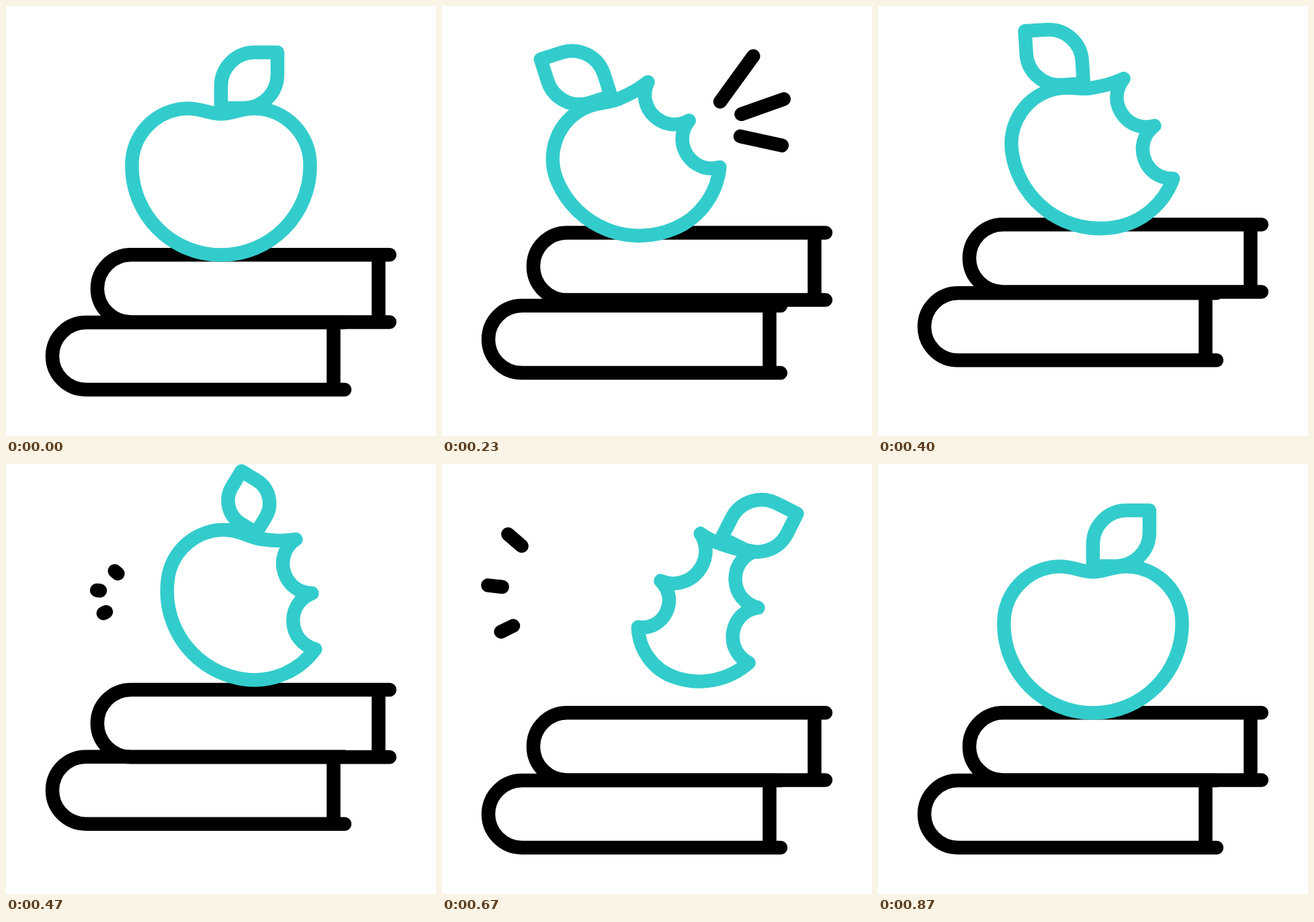
An HTML page for the animation above (1.67 s loop, 640 by 640 pixels).

```html
<!DOCTYPE html>
<html lang="en">
<head>
<meta charset="utf-8">
<title>Apple on books</title>
<style>
  html, body { margin: 0; width: 100%; height: 100%; overflow: hidden; background: #fff; }
  svg { display: block; width: 100vw; height: 100vh; }
  path { stroke-width: 20.5; stroke-linecap: round; stroke-linejoin: round; }
</style>
</head>
<body>
<svg viewBox="0 0 640 640">
  <g fill="none" stroke="#000">
    <path id="low" d="M504 471H119a50 50 0 0 0 0 100H504M487.5 471V571"/>
    <path id="top" d="M571 370.3H186a50 50 0 0 0 0 100.2H571M554.5 370.3V470.5"/>
    <path id="sparksRight" transform="translate(445.5 161) rotate(-19.5)"/>
    <path id="sparksLeft" transform="translate(140 188.5) scale(-1 1) rotate(-6.3)"/>
  </g>
  <g id="apple" fill="#fff" stroke="#33cccc">
    <path id="leaf"/>
    <path id="body"/>
  </g>
</svg>
<script>
const LOOP = 1670, FPS = 30, LAST = 26;
const RADIUS = 132.6, DIP = -77.5, RAD = Math.PI / 180;

const el = id => document.getElementById(id);
const mix = (a, b, p) => a + (b - a) * p;
const place = (id, transform) => el(id).setAttribute("transform", transform);
const shape = (id, d) => el(id).setAttribute("d", d);

// Eased 0..1 progress of frame k between a and b
function ease(k, a, b) {
  const t = Math.min(1, Math.max(0, (k - a) / (b - a)));
  return t * t * (3 - 2 * t);
}

// Corner points of one half: shoulder, side, hip
const WHOLE = [[50, -85.5], [RADIUS, 0], [RADIUS * Math.SQRT1_2, RADIUS * Math.SQRT1_2]];
const RIGHT_BITE = [[50, -83], [83, -6], [97, 76]];
const LEFT_BITE = [[34, -82], [67, 4], [76, 80]];
const BITE_ARC = -145;

// Circular arc of the given sweep in degrees; a negative sweep cuts inward
function arc([ax, ay], [bx, by], sweep) {
  const half = sweep / 2 * RAD;
  const reach = 4 / 3 * Math.tan(half / 2) / (2 * Math.sin(half));
  const along = reach * Math.cos(half), out = reach * Math.sin(half);
  const dx = bx - ax, dy = by - ay;
  return [
    [ax + dx * along + dy * out, ay + dy * along - dx * out],
    [bx - dx * along + dy * out, by - dy * along - dx * out],
    [bx, by]
  ];
}

// Half outline from the dip to the bottom; p runs from whole to bitten
function half(bite, p) {
  const [a, b, c] = WHOLE.map((pt, i) => pt.map((n, j) => mix(n, bite[i][j], p)));
  const belly = 2 * Math.atan2(RADIUS - c[1], c[0]) / RAD;
  return [
    [0, DIP], [a[0] * 0.36, DIP], [a[0] * 0.55, mix(a[1], DIP, p)], a,
    ...arc(a, b, mix(90, BITE_ARC, p)),
    ...arc(b, c, mix(45, BITE_ARC, p)),
    ...arc(c, [0, RADIUS], belly)
  ];
}

function bodyPath(right, left) {
  const mirrored = half(LEFT_BITE, left).map(([x, y]) => [-x, y]).reverse();
  const [start, ...rest] = [...half(RIGHT_BITE, right), ...mirrored.slice(1)];
  return `M${start}C${rest.join(" ")}Z`;
}

function leafPath(s) {
  const r = 50 * s;
  return `M0 0V${-33 * s}a${r} ${r} 0 0 1 ${r} ${-r}H${84 * s}v${33 * s}a${r} ${r} 0 0 1 ${-r} ${r}Z`;
}

// Inner end, angle and length of each ray in a burst
const RAYS = [[-23.5, -28, -34.5, 90], [0, 0, 0, 72], [-12.4, 30.5, 32, 68]];

// Rays grow from the inner end, then shrink toward the outer end
function sparkPath(k) {
  const head = ease(k, 0, 4.4), tail = ease(k, 3.7, 8.4);
  if (head <= 0 || tail >= 1) return "";
  return RAYS.map(([x, y, angle, length]) => {
    const dx = length * Math.cos(angle * RAD), dy = length * Math.sin(angle * RAD);
    return `M${x + dx * tail} ${y + dy * tail}L${x + dx * head} ${y + dy * head}`;
  }).join("");
}

function drawBooks(k) {
  place("top", `translate(0 ${-47 * (ease(k, 0, 11) - ease(k, 10.9, 20))})`);
  place("low", `translate(0 ${-44 * (ease(k, 1.4, 11.7) - ease(k, 11.6, 20))})`);
}

// Lean left, swing right with a hop, then settle back
function drawApple(k) {
  const swing = ease(k, 9, 17), settle = ease(k, 18.9, 26);
  const x = 320 - 26 * ease(k, 0, 7) + 111 * ease(k, 9, 16.8) - 85 * ease(k, 17.8, 26);
  const y = 238 - 30 * ease(k, 0, 8) - 19 * ease(k, 10, 14) + 49 * settle;
  const turn = -24 * ease(k, 0, 7.5) + 44.5 * swing - 20.5 * settle;
  place("apple", `translate(${x} ${y}) rotate(${turn})`);

  const heal = 1 - ease(k, 20, 26);
  shape("body", bodyPath(ease(k, 1, 4) * heal, ease(k, 14, 16.5) * heal));

  // The leaf flips left by turning and flips back through a narrower shape
  const back = ease(k, 11.6, 19.2);
  const flip = Math.atan2(back, 1 - back) / (90 * RAD);
  const sway = 8 * (ease(k, 12, 17) - ease(k, 19, 26));
  const leafTurn = -84 * ease(k, 0, 5.6) * (1 - flip) + sway;
  const leafX = -10 * (ease(k, 0, 9) - ease(k, 13, 23));
  place("leaf", `translate(${leafX} -86) rotate(${leafTurn})`);
  shape("leaf", leafPath(Math.hypot(back, 1 - back)));
}

function draw(ms) {
  const k = Math.min(LAST, Math.floor((ms % LOOP + 4) * FPS / 1000));
  drawBooks(k);
  drawApple(k);
  shape("sparksRight", sparkPath(k - 3.3));
  shape("sparksLeft", sparkPath(k - 13.3));
}

const begin = performance.now();
function tick() {
  draw(performance.now() - begin);
  requestAnimationFrame(tick);
}
tick();
</script>
</body>
</html>
```
